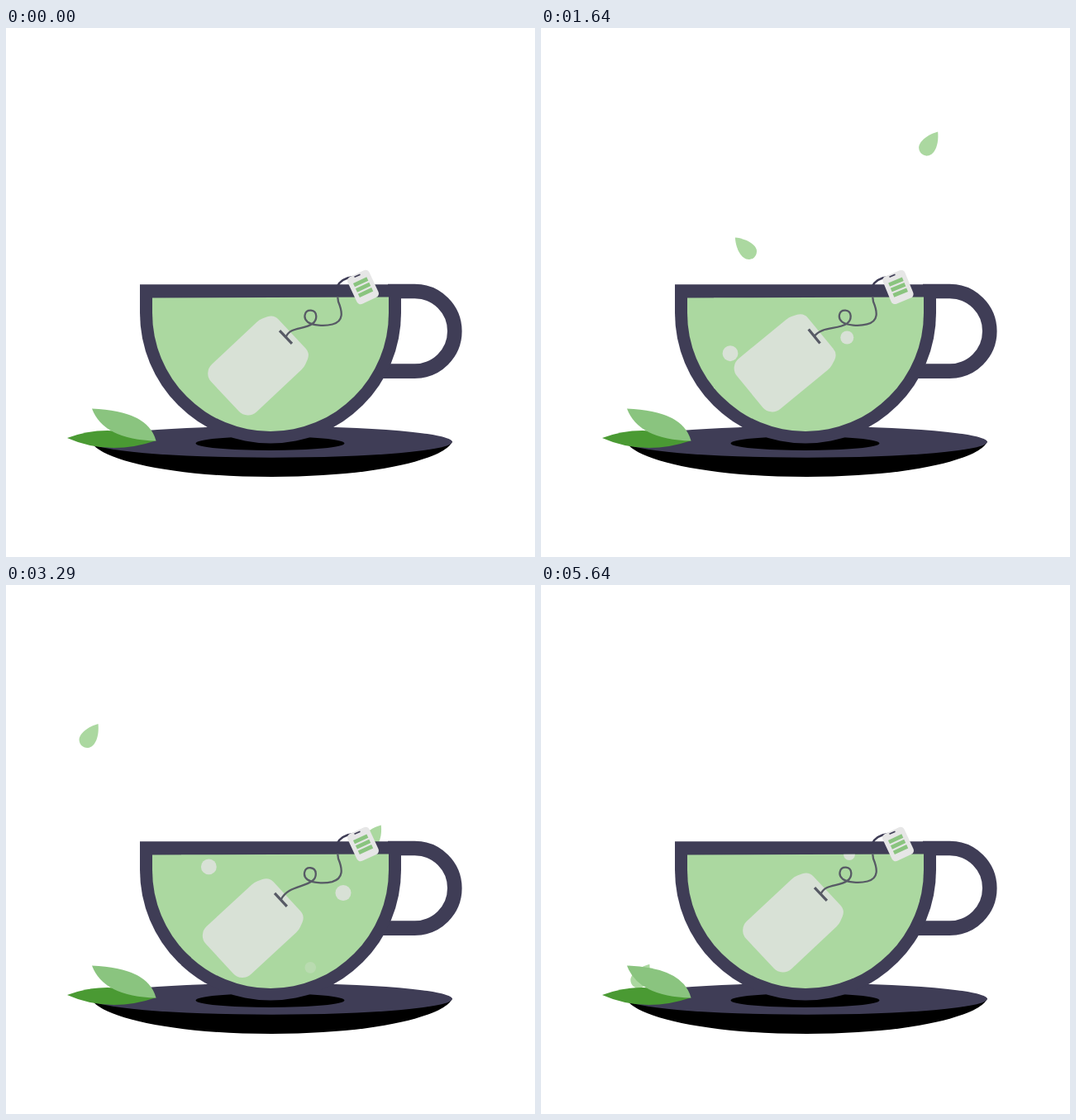
These frames come from a looping animation (640x640 px, 5710 ms). An HTML page:

```html
<!DOCTYPE html>
<html lang="en">
<head>
<meta charset="utf-8">
<title>Tea cup</title>
<style>
  html, body { margin: 0; width: 100%; height: 100%; overflow: hidden; background: #fff; }
  svg { display: block; width: 100vw; height: 100vh; }
</style>
</head>
<body>
<svg viewBox="0 0 640 640" xmlns="http://www.w3.org/2000/svg">
  <defs>
    <path id="drop" d="M0,0C-12,3 -23,12 -23,19C-23,25 -18,29.5 -12.5,29C-3,28 1.5,14 0,0Z"/>
    <path id="tea" d="M177,326.4L463,325.6V345A143,143 0 0 1 177,345Z"/>
    <clipPath id="inside"><use href="#tea"/></clipPath>
  </defs>

  <g id="falling" fill="#abd8a0"></g>

  <!-- saucer -->
  <path d="M103,500C110,520 190,543 321.5,543S533,520 540,500Z"/>
  <ellipse cx="321.5" cy="500.7" rx="218.3" ry="19" fill="#3f3d56"/>
  <ellipse cx="319.5" cy="502.5" rx="90" ry="8.5"/>

  <!-- cup -->
  <path d="M462,318.5H494.5A48.3,48.3 0 0 1 494.5,415.1H452" fill="none" stroke="#3f3d56" stroke-width="17.6"/>
  <path d="M162,310.2H478V345A158,157.5 0 0 1 162,345Z" fill="#3f3d56"/>
  <use href="#tea" fill="#abd8a0"/>

  <g clip-path="url(#inside)">
    <g id="bag">
      <path fill="#d8e1d6" transform="translate(2.2 47.3)" d="M-24,-55.5H24Q32,-55.5 35.5,-48L38,-42Q39.5,-38.5 39.5,-34V40.5A15,15 0 0 1 24.5,55.5H-24.5A15,15 0 0 1 -39.5,40.5V-34Q-39.5,-38.5 -38,-42L-35.5,-48Q-32,-55.5 -24,-55.5Z"/>
    </g>
    <g id="bubbles" fill="#d8e1d6"></g>
    <path id="rope" fill="none" stroke="#575a65" stroke-width="2.3"/>
    <path id="clip" d="M-10.9,0H10.9" stroke="#575a65" stroke-width="3.2"/>
  </g>

  <!-- label -->
  <path d="M400.5,313Q405,303 420,301" fill="none" stroke="#3f3d56" stroke-width="2.3"/>
  <g id="label">
    <rect x="-14.4" y="-18" width="28.8" height="36" rx="5" fill="#e6e6e6"/>
    <path d="M-9,-6.8H9M-9,.2H9M-9,7.2H9" stroke="#8ac47f" stroke-width="4.8"/>
  </g>
  <path d="M421.5,301.3L428.5,298.3" stroke="#3f3d56" stroke-width="1.6"/>

  <!-- resting leaves -->
  <path d="M74,496Q125,476.5 182,499Q125,518.5 74,496Z" fill="#4a9a33"/>
  <path d="M104,460.5Q172,463 181.5,499.5Q118,498 104,460.5Z" fill="#8ac47f"/>
</svg>

<script>
const LOOP = 5710, TOP = 64;
const $ = id => document.getElementById(id);

// Leaves fall at a steady speed from TOP and drift sideways through [time, x] points
const leaves = [
  { from: 605, to: 2500, speed: .183, turn: "rotate(-10) scale(-1 1)", drift: [[640, 212], [1070, 224], [2500, 250]] },
  { from: 1025, to: 5300, speed: .1, turn: "", drift: [[1070, 466], [2210, 487.3], [3290, 453.8], [4790, 443.3]] },
  { from: 2450, to: LOOP, speed: .1237, turn: "", drift: [[2500, 121], [2850, 106], [3290, 111.5], [4140, 129.5], [5640, 131.3]] }
];

// Bubbles rise in straight lines: start place, velocity per ms
const bubbles = [
  { r: 9.4, from: 570, to: 4200, x: 218.4, y: 428, vx: .0099, vy: -.032 },
  { r: 8, from: 500, to: 2700, x: 375.5, y: 443.5, vx: -.0046, vy: -.0605 },
  { r: 9.5, from: 2070, to: 4700, x: 411.9, y: 412.5, vx: -.0032, vy: -.0328 },
  { r: 6.9, from: 3150, to: LOOP, x: 368, y: 471, vx: .002, vy: -.0582 }
];

// Tea bag poses: clip x, clip y, angle
const rest = [338.5, 374, 46.8], left = [330.5, 372.4, 50.8], low = [333, 383.2, 46.3];

const clamp = v => Math.max(0, Math.min(1, v));
const ease = p => (1 - Math.cos(Math.PI * p)) / 2;
const mix = (a, b, p) => a.map((v, i) => v + (b[i] - v) * p);

// Smooth curve through [time, value] points
function along(pts, t) {
  const last = pts.length - 1;
  let i = 0;
  while (i < last - 1 && t > pts[i + 1][0]) i++;
  const [ta, a] = pts[i], [tb, b] = pts[i + 1], span = tb - ta;
  const slope = j => {
    const u = pts[Math.max(0, j - 1)], v = pts[Math.min(last, j + 1)];
    return span * (v[1] - u[1]) / (v[0] - u[0]);
  };
  const p = clamp((t - ta) / span), s = 1 - p;
  return a * s * s * (1 + 2 * p) + b * p * p * (3 - 2 * p) + slope(i) * p * s * s - slope(i + 1) * p * p * s;
}

function add(parent, tag, attrs) {
  const el = document.createElementNS("http://www.w3.org/2000/svg", tag);
  for (const k in attrs) el.setAttribute(k, attrs[k]);
  return $(parent).appendChild(el);
}

function show(item, t) {
  const on = t >= item.from && t < item.to;
  item.el.style.display = on ? "" : "none";
  return on;
}

leaves.forEach(l => l.el = add("falling", "use", { href: "#drop" }));
bubbles.forEach(b => b.el = add("bubbles", "circle", { r: b.r }));

// Each rope point follows the clip by its weight w
function ropePath(x, y) {
  const dx = x - rest[0], dy = y - rest[1];
  const pt = (px, py, w) => `${px + dx * w},${py + dy * w} `;
  const w = .08;
  return "M" + pt(338.5, 374, 1) +
    "C" + pt(344, 361, .5) + pt(360, 365.5, .1) + pt(371, 357.5, w) +
    "C" + pt(377, 353, w) + pt(377, 342.5, w) + pt(369, 341.7, w) +
    "C" + pt(361, 341, w) + pt(359, 351, w) + pt(365, 355.7, w) +
    "C" + pt(371, 360, w) + pt(385, 361, w) + pt(395, 358.5, w) +
    "C409,355 407,343 402,331L400.5,320";
}

function draw(t) {
  for (const l of leaves) {
    if (!show(l, t)) continue;
    const y = TOP + (t - l.from) * l.speed;
    l.el.setAttribute("transform", `translate(${along(l.drift, t)} ${y}) ${l.turn}`);
  }
  for (const b of bubbles) {
    if (!show(b, t)) continue;
    const age = t - b.from;
    const out = b.to < LOOP ? clamp((b.to - t) / 400) : 1;
    b.el.setAttribute("cx", b.x + b.vx * age);
    b.el.setAttribute("cy", b.y + b.vy * age);
    b.el.setAttribute("opacity", clamp(age / 480) * out);
  }

  // Swing out and back, mirrored around the middle of the loop
  const q = 2 * (1 - Math.abs(1 - 2 * t / LOOP));
  const [x, y, a] = q < 1 ? mix(rest, left, ease(q)) : mix(left, low, ease(q - 1));
  const pose = `translate(${x} ${y}) rotate(${a})`;
  $("bag").setAttribute("transform", pose);
  $("clip").setAttribute("transform", pose);
  $("rope").setAttribute("d", ropePath(x, y));
  $("label").setAttribute("transform", `translate(432 313.5) rotate(${-25 + (a - rest[2]) * .75})`);
}

const start = performance.now();
function tick() {
  draw((performance.now() - start) % LOOP);
  requestAnimationFrame(tick);
}
draw(0);
requestAnimationFrame(tick);
</script>
</body>
</html>
```
